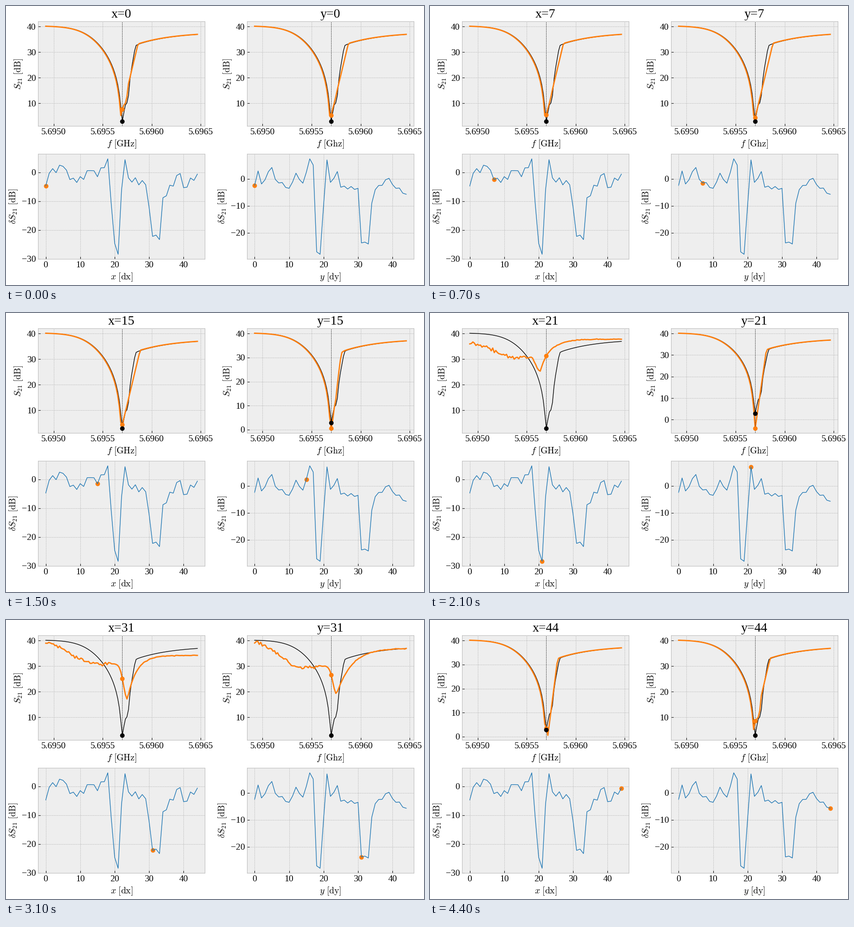
Recreate the animation shown at these times as a matplotlib script. Size 900 px wide and 600 px high, loop 4500 ms.

```python
import numpy as np
import matplotlib.pyplot as plt
from matplotlib.animation import FuncAnimation
from matplotlib.ticker import MultipleLocator

W, H, DPI = 900, 600, 100
STEPS, INTERVAL = 45, 100
ORANGE, BLUE = "#ff7f0e", "#1f77b4"

plt.rcParams.update({
    "font.family": "Liberation Serif", "font.size": 14,
    "axes.titlesize": 20, "mathtext.fontset": "cm",
    "axes.facecolor": "#eeeeee", "axes.edgecolor": "#bcbcbc",
    "axes.axisbelow": True, "axes.grid": True,
    "grid.color": "#b2b2b2", "grid.linestyle": "--", "grid.linewidth": 0.5,
    "xtick.direction": "in", "ytick.direction": "in",
})

N, MID, FLOOR = 100, 50, 2.95
idx = np.arange(N)
freq = np.linspace(5.69492, 5.696465, N)
rng = np.random.default_rng(4)


def scan(keys, zigzag):
    """Level change per step: straight runs between keys, with a zigzag on them."""
    at, level = zip(*keys)
    k = np.arange(STEPS)
    return np.interp(k, at, level) + np.where(np.isin(k, at), 0, zigzag * (-1.0) ** k)


def notch(left=50, foot=50, low=FLOOR, slope=3.45, rise=55.2):
    """Resonance dip: steep fall, short shoulder, then a sharp rise to a plateau."""
    r = np.maximum(left - idx, 0)
    fall = 40.25 - 10 * np.log10(1 + np.exp(7.62 - .035 * r - .0007 * r**2) / (r**2 + .38))
    s = idx - rise
    plateau = 37.9 - 5.1 * np.exp(-np.maximum(s - 3.8, 0) / 24)
    climb = 9 + (plateau - 9) / (1 + np.exp(-s / .75))
    return np.where(idx < MID, fall, np.minimum(low + slope * (idx - foot), climb))


def broad(start, sag, centre, floor, end, tail):
    """Disturbed mode: sagging left side, one dip, slow recovery."""
    t = np.clip(idx / 31, 0, 1)
    d = idx - centre
    left = start + (sag - start) * t * t * (3 - 2 * t)
    left += (floor - sag) * np.exp(-(d / 3.5) ** 2)
    right = end + (floor - end) * np.exp(-np.maximum(d, 0) / tail)
    ripple = rng.normal(0, 1, N) * np.where(idx < 45, .35, .06)
    return np.where(d < 0, left, right) + ripple


ref = notch()
ref[MID] = FLOOR


def response(v, wide):
    """Curve whose level at the reference frequency is v."""
    if v > 11:
        return ref + (v - FLOOR) / (wide[MID] - FLOOR) * (wide - ref)
    if v < 4:
        y = notch(49.5, 50 + np.clip(v / 3, 0, 1), v - np.clip(v, 0, 3), 5, 54.3)
    else:
        y = notch(49.5, 50, v, 2.5, 54.3)
    y[MID] = v
    return y


def axes_at(left, top, bottom, width=359.1):
    return fig.add_axes([left / W, 1 - bottom / H, width / W, (bottom - top) / H])


def padded(*data):
    lo, hi = np.min(data), np.max(data)
    m = .05 * (hi - lo)
    return lo - m, hi + m


class Column:
    def __init__(self, left, name, unit, delta, early, late):
        self.name, self.delta = name, delta
        self.curves = [response(FLOOR - d, early if k < 25 else late)
                       for k, d in enumerate(delta)]
        self.top = top = axes_at(left, 33.3, 258.3)
        low = axes_at(left, 318.4, 544.2)

        top.plot(freq, ref, color="black", lw=1)
        self.line, = top.plot(freq, ref, color=ORANGE, lw=2)
        top.axvline(freq[MID], color="black", ls="--", lw=.5)
        self.dot, = top.plot([], [], "o", color=ORANGE, ms=6)
        top.plot(freq[MID], FLOOR, "o", color="black", ms=6)
        top.set_xlim(*padded(freq))
        top.xaxis.set_major_locator(MultipleLocator(.0005))
        top.xaxis.set_major_formatter("{x:.4f}")
        top.set_xlabel(rf"$f\ \mathrm{{[{unit}]}}$")
        top.set_ylabel(r"$S_{21}\ \mathrm{[dB]}$")

        low.plot(delta, color=BLUE, lw=1)
        self.mark, = low.plot([], [], "o", color=ORANGE, ms=6, zorder=1.5)
        low.set_xlim(*padded(range(STEPS)))
        low.set_ylim(*padded(delta))
        low.xaxis.set_major_locator(MultipleLocator(10))
        low.set_xlabel(rf"${name}\ \mathrm{{[d{name}]}}$")
        low.set_ylabel(r"$\delta S_{21}\ \mathrm{[dB]}$")
        for ax in (top, low):
            ax.yaxis.set_major_locator(MultipleLocator(10))

    def show(self, k):
        y = self.curves[k]
        self.line.set_ydata(y)
        self.dot.set_data([freq[MID]], [y[MID]])
        self.mark.set_data([k], [self.delta[k]])
        self.top.set_ylim(*padded(y, ref))
        self.top.set_title(f"{self.name}={k}")
        return self.line, self.dot, self.mark


scan_x = scan([(0, -4.7), (1, -.3), (5, 2.1), (7, -2.5), (9, -3.5), (13, .6), (15, -1.5),
               (18, 4.7), (20, -24.6), (21, -28.4), (22, -6), (23, 4.4), (24, -1.9),
               (29, -4.3), (31, -22.2), (33, -23.3), (34, -8.8), (39, -.4), (40, -5.3),
               (44, -.6)], 1)
scan_y = scan([(0, -2.4), (1, 2.9), (2, -1.9), (5, 4.2), (6, -.2), (10, -3.5), (12, 2.1),
               (14, -1.6), (16, 7.4), (17, 5.1), (18, -27), (19, -27.9), (21, 7),
               (22, -1.3), (24, 2.7), (25, -3.1), (30, -3.5), (31, -23.7), (33, -24.1),
               (34, -9), (35, -4), (39, .2), (40, -2.1), (44, -5.7)], .5)

early = broad(36.3, 30.8, 46, 25.2, 37.8, 7)
late_x = broad(39, 31, 53.3, 17.2, 34.2, 6)
late_y = broad(39.4, 29.7, 53.5, 18.8, 37, 9.5)

fig = plt.figure(figsize=(W / DPI, H / DPI), dpi=DPI, facecolor="white")
columns = [Column(69.3, "x", "GHz", scan_x, early, late_x),
           Column(519.0, "y", "Ghz", scan_y, early, late_y)]


def update(k):
    return [artist for col in columns for artist in col.show(k)]


anim = FuncAnimation(fig, update, frames=STEPS, interval=INTERVAL, repeat=True,
                     repeat_delay=0, blit=False)
plt.show()
```
